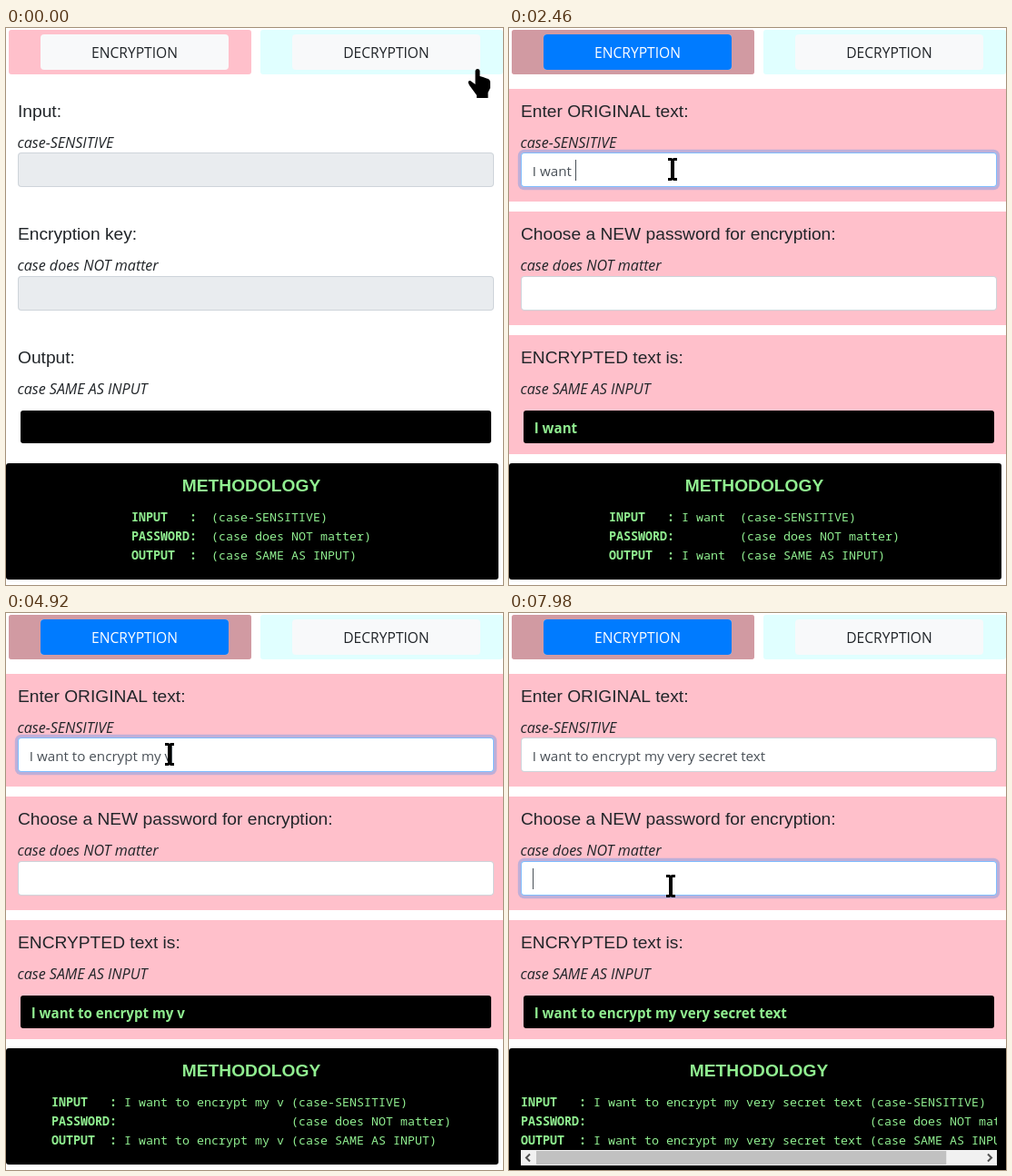
Animation, 547 px wide and 613 px high, one loop 8000 ms. Source, as an HTML page with a canvas:

```html
<!DOCTYPE html>
<html lang="en">
<head>
<meta charset="utf-8">
<title>Encryption form</title>
<style>
  html, body { margin: 0; width: 100%; height: 100%; overflow: hidden; background: #fff; }
  canvas { display: block; width: 547px; height: 613px; }
</style>
</head>
<body>
<canvas id="stage"></canvas>
<script>
const WIDTH = 547, HEIGHT = 613, LOOP = 8000, STEP = 60;
const PINK = '#ffc0cb', GREEN = '#90ee90', INK = '#212529';
const SANS = '"Open Sans", "Noto Sans", sans-serif';
const HEADING = '19.2px "Liberation Sans", Arial, sans-serif';
const NOTE = 'italic 16.1px ' + SANS;
const BUTTON = '15.6px ' + SANS;
const FIELD = '15.2px ' + SANS;
const RESULT = 'bold 15.1px ' + SANS;
const MONO = '13.333px "Noto Sans Mono", monospace';
const CHAR = 8;

const MESSAGE = 'I want to encrypt my very secret text';
const KEY_TIMES = [
  1740, 1920, 2040, 2160, 2220, 2340, 2460, 2580, 2700, 2820, 3000, 3120, 3180,
  3420, 3600, 3900, 3960, 4140, 4440, 4560, 4680, 4920, 5100, 5160, 5340, 5460,
  5520, 5700, 5880, 6060, 6180, 6300, 6420, 6540, 6660, 6780, 6960
];
const CLICK = 540, FOCUS = 1020, FOCUS_KEY = 7800;

// Pointer path: time, x, y
const POINTER = [
  [0, 519, 45], [180, 330, 72], [360, 165, 30], [600, 165, 30],
  [1020, 180, 156], [7380, 180, 156], [7740, 178, 301], [LOOP, 178, 301]
];
const HAND = new Path2D('M-2.5 2Q-2 0 0 0Q2 0 2.5 2V8L6 9L10 10.5Q14 11 14 15V21L11.5 26V32H-1V29L-9 18Q-12 13-8 13L-2.5 17Z');
const ARROW = new Path2D('M0 0V22L5 17L9 26L13 24L9 16H16Z');
const IBEAM = new Path2D('M-5-13H-1L0-12L1-13H5V-10H2V9H5V12H1L0 11L-1 12H-5V9H-2V-10H-5Z');

const canvas = document.getElementById('stage');
const ctx = canvas.getContext('2d');
const ratio = window.devicePixelRatio || 1;
canvas.width = WIDTH * ratio;
canvas.height = HEIGHT * ratio;
ctx.scale(ratio, ratio);

const clamp = v => Math.max(0, Math.min(1, v));

function box(x, y, w, h, color, radius = 0, alpha = 1) {
  ctx.globalAlpha = alpha;
  ctx.fillStyle = color;
  ctx.beginPath();
  ctx.roundRect(x, y, w, h, radius);
  ctx.fill();
  ctx.globalAlpha = 1;
}

function text(string, x, y, font, color = INK, align = 'left') {
  ctx.font = font;
  ctx.fillStyle = color;
  ctx.textAlign = align;
  ctx.fillText(string, x, y);
}

function buttons(pressed, hovered) {
  box(3, 2, 267, 49, PINK, 3);
  box(3, 2, 267, 49, '#d19aa2', 3, pressed);
  box(38, 7, 207, 39, hovered ? '#e2e6ea' : '#f8f9fa', 4);
  box(38, 7, 207, 39, '#007bff', 4, pressed);
  text('ENCRYPTION', 141.5, 33, BUTTON, pressed > .5 ? '#fff' : INK, 'center');
  box(280, 2, 267, 49, '#e0ffff', 3);
  box(315, 7, 207, 39, '#f8f9fa', 4);
  text('DECRYPTION', 418.5, 33, BUTTON, INK, 'center');
}

function section(y, height, active, idleTitle, activeTitle, note) {
  if (active) box(0, y, WIDTH, height, PINK);
  text(active ? activeTitle : idleTitle, 13, y + 31, HEADING);
  text(note, 12.5, y + 65, NOTE);
}

function field(y, enabled, focus, value, caret) {
  box(9.8, y - 3.2, 530.4, 44.4, '#007bff', 7, .25 * focus);
  box(13, y, 524, 38, '#ced4da', 4);
  box(13, y, 524, 38, '#80bdff', 4, focus);
  box(14, y + 1, 522, 36, enabled ? '#fff' : '#e9ecef', 3);
  text(value, 25.8, y + 26, FIELD, '#495057');
  if (caret) box(Math.round(25.8 + ctx.measureText(value).width), y + 8, 1, 23, '#495057');
}

function scrollbar(contentWidth) {
  box(13, 591, 524, 17, '#f1f1f1');
  box(30, 592, 490 * 524 / (contentWidth + 9), 15, '#c1c1c1');
  ctx.strokeStyle = '#505050';
  ctx.lineWidth = 2;
  for (const [x, dir] of [[21, -1], [529, 1]]) {
    ctx.beginPath();
    ctx.moveTo(x - 2 * dir, 595.5);
    ctx.lineTo(x + 2 * dir, 599.5);
    ctx.lineTo(x - 2 * dir, 603.5);
    ctx.stroke();
  }
}

function methodology(value) {
  const width = (33 + value.length) * CHAR;
  const overflow = width > 524;
  const left = overflow ? 13 : 270 - width / 2;
  box(0, 479, overflow ? 560 : 542, overflow ? 150 : 128, '#000', 3);
  text('METHODOLOGY', overflow ? 275 : 270, 510, 'bold ' + HEADING, GREEN, 'center');

  const rows = [
    ['INPUT   :', value, '(case-SENSITIVE)'],
    ['PASSWORD:', '', '(case does NOT matter)'],
    ['OUTPUT  :', value, '(case SAME AS INPUT)']
  ];
  ctx.save();
  ctx.beginPath();
  ctx.rect(0, 479, 537, 134);
  ctx.clip();
  rows.forEach(([label, content, note], i) => {
    const y = 543 + 21 * i;
    text(label, left, y, '600 ' + MONO, GREEN);
    text(content, left + 10 * CHAR, y, MONO, GREEN);
    text(note, left + (11 + value.length) * CHAR, y, MONO, GREEN);
  });
  ctx.restore();
  if (overflow) scrollbar(width);
}

function pointerAt(t) {
  const i = POINTER.findIndex(p => p[0] > t);
  const [t0, x0, y0] = POINTER[i - 1], [t1, x1, y1] = POINTER[i];
  const k = (t - t0) / (t1 - t0);
  return [x0 + (x1 - x0) * k, y0 + (y1 - y0) * k];
}

function inside([x, y], left, top, width, height) {
  return x >= left && x <= left + width && y >= top && y <= top + height;
}

function drawPointer(p) {
  const onButton = inside(p, 38, 7, 207, 39) || inside(p, 315, 7, 207, 39);
  const onField = inside(p, 13, 137, 524, 38) || inside(p, 13, 273, 524, 38);
  ctx.save();
  ctx.translate(...p);
  ctx.fillStyle = '#000';
  ctx.fill(onButton ? HAND : onField ? IBEAM : ARROW);
  ctx.restore();
}

function draw(t) {
  const value = MESSAGE.slice(0, KEY_TIMES.filter(k => k <= t).length);
  const clicked = t >= CLICK, typed = value.length > 0;
  const keyFocus = clamp((t - FOCUS_KEY) / 150);
  const inputFocus = clamp((t - FOCUS + STEP) / 180) * (1 - keyFocus);
  const inputCaret = t >= FOCUS && t < 7200 && !(t >= 1560 && t < 1740);
  const pointer = pointerAt(t);

  box(0, 0, WIDTH, HEIGHT, '#fff');
  buttons(clamp((t - CLICK + STEP) / 150), inside(pointer, 38, 7, 207, 39));

  section(67, 124, clicked, 'Input:', 'Enter ORIGINAL text:', 'case-SENSITIVE');
  field(137, clicked, inputFocus, value, inputCaret);

  section(202, 125, typed, 'Encryption key:', 'Choose a NEW password for encryption:', 'case does NOT matter');
  field(273, typed, keyFocus, '', t > FOCUS_KEY);

  section(338, 131, typed, 'Output:', 'ENCRYPTED text is:', 'case SAME AS INPUT');
  box(16, 421, 518, 36, '#000', 3);
  text(value, 27.7, 446, RESULT, GREEN);

  methodology(value);
  drawPointer(pointer);
}

const start = performance.now();
function tick() {
  const t = (performance.now() - start) % LOOP;
  draw(Math.floor(t / STEP) * STEP);
  requestAnimationFrame(tick);
}
tick();
</script>
</body>
</html>
```
